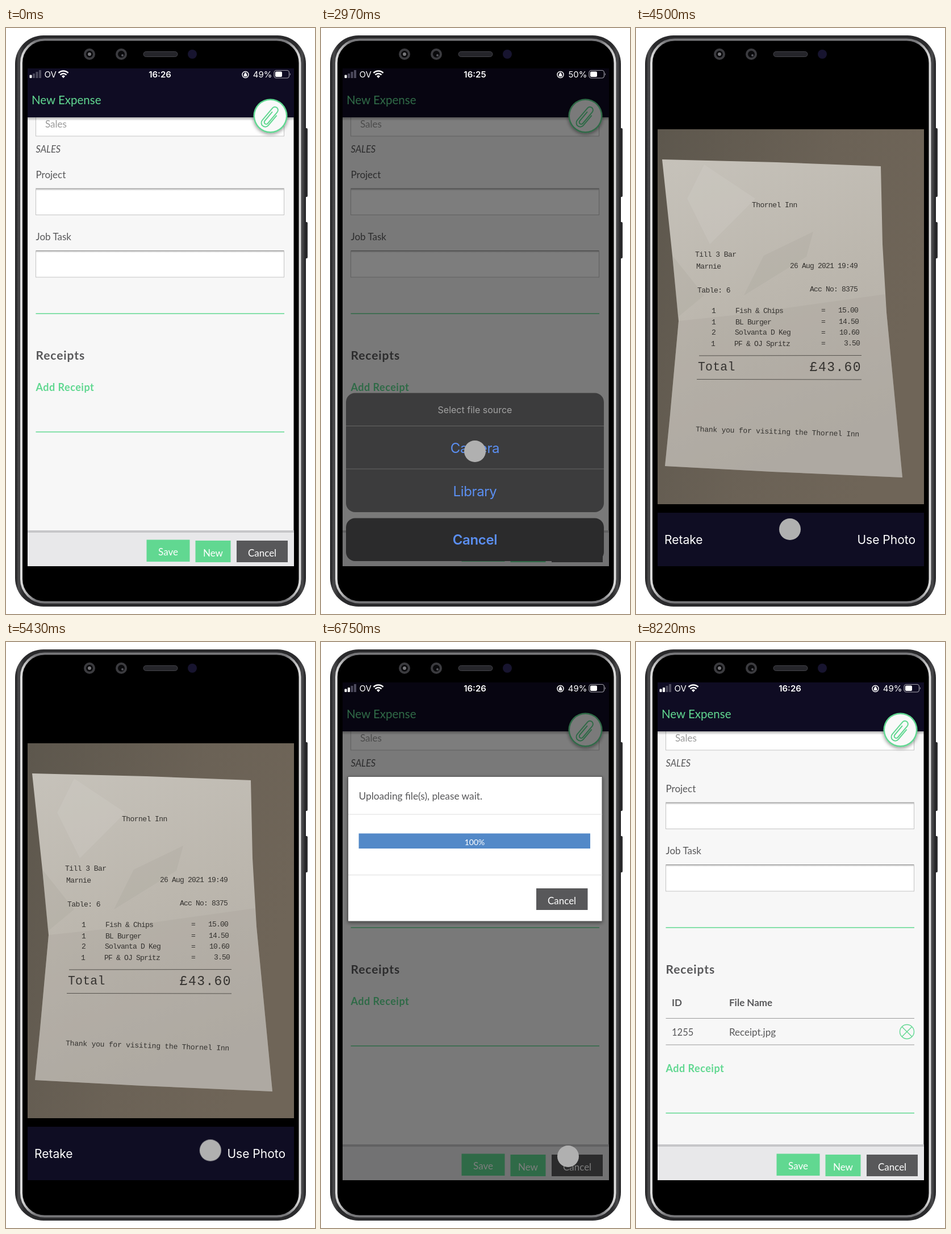
An HTML page that plays this animation: 544 px wide and 1030 px high, repeating every 9.48 s.

```html
<!DOCTYPE html>
<html lang="en">
<head>
<meta charset="utf-8">
<title>Adding a receipt</title>
<style>
html, body { margin: 0; width: 100%; height: 100%; overflow: hidden; background: #fff; }
svg { display: block; width: 100vw; height: 100vh; }
text { font: 17px Lato, "Open Sans", sans-serif; fill: #58585a; white-space: pre; }
.mid { text-anchor: middle; }
.end { text-anchor: end; }
.bold { font-weight: 700; }
.white { fill: #fff; }
.green { fill: #61d891; }
.rule { stroke: #61d891; stroke-width: 1.6; }
.grey { stroke: #999; stroke-width: 1.2; }
.thin { stroke: #ddd; }
.icon { fill: none; stroke: #61d891; stroke-width: 2; }
.field { fill: #fff; stroke: #c4c4c4; }
.ios text { font-family: Inter, Roboto, sans-serif; }
.status text { font-size: 15px; fill: #fff; }
.sheet text { font-size: 24px; letter-spacing: -.35px; fill: #5b8ff2; }
.bar text { font-size: 21px; fill: #fff; }
.paper text { font: 13px "Liberation Mono", "DejaVu Sans Mono", monospace; letter-spacing: -.55px; fill: #34322f; }
.paper .tight text { letter-spacing: -.8px; }
.paper .wide { font-size: 21.5px; letter-spacing: .2px; }
.paper .wide.end { font-size: 23px; letter-spacing: 1.4px; }

/* One shared 9480 ms clock; percentages are ms / 94.8 */
.a { animation: 9480ms step-end infinite; }
.sheet { animation-name: sheet; }
.before { animation-name: before; }
.camera { animation-name: camera; }
.live { animation-name: live; }
.review { animation-name: review; }
.upload { animation-name: upload; }
.busy { animation-name: busy; }
.done { animation-name: done; }
.list { animation-name: list; }
.push { animation-name: push; }
.signal { animation-name: signal; }
.dot { animation-name: dot-show, dot-move; }

@keyframes sheet { 0%, 31.962%, 100% { opacity: 0 } 16.1392% { opacity: 1 } }
@keyframes before { 0%, 31.962%, 100% { opacity: 1 } 16.1392% { opacity: 0 } }
@keyframes camera { 0%, 63.2911%, 100% { opacity: 0 } 31.962% { opacity: 1 } }
@keyframes live { 0%, 47.4683%, 100% { opacity: 0 } 31.962% { opacity: 1 } }
@keyframes review { 0%, 63.2911%, 100% { opacity: 0 } 47.4683% { opacity: 1 } }
@keyframes upload { 0%, 86.7088%, 100% { opacity: 0 } 63.2911% { opacity: 1 } }
@keyframes busy { 0%, 71.8354%, 100% { opacity: 0 } 63.2911% { opacity: 1 } }
@keyframes done { 0%, 86.7088%, 100% { opacity: 0 } 71.8354% { opacity: 1 } }
@keyframes list { 0% { opacity: 0 } 86.7088%, 100% { opacity: 1 } }
@keyframes push { 0% { transform: none } 86.7088%, 100% { transform: translateY(118px) } }
@keyframes signal { 0% { fill: #4c4a5c } 63.2911%, 100% { fill: #fff } }
@keyframes dot-show { 0%, 86.7088%, 100% { opacity: 0 } 9.1772% { opacity: 1 } }
@keyframes dot-move {
  0% { transform: translate(109px, 635px) }
  21.8354% { transform: translate(109px, 635px); animation-timing-function: steps(23, start) }
  29.1139% { transform: translate(271px, 744px) }
  38.6075% { transform: translate(271px, 744px); animation-timing-function: steps(20, start) }
  44.9367% { transform: translate(271px, 881px) }
  53.481% { transform: translate(271px, 881px); animation-timing-function: steps(24, start) }
  61.0759% { transform: translate(435px, 904px) }
  76.5822% { transform: translate(435px, 904px); animation-timing-function: steps(26, start) }
  84.8101%, 100% { transform: translate(426px, 467px) }
}
</style>
</head>
<body>
<svg viewBox="0 0 544 1030" xmlns="http://www.w3.org/2000/svg">
<defs>
  <linearGradient id="body">
    <stop offset="0" stop-color="#1d1d1f"/><stop offset=".012" stop-color="#4a4a4c"/>
    <stop offset=".03" stop-color="#2a2a2c"/><stop offset=".97" stop-color="#2a2a2c"/>
    <stop offset=".988" stop-color="#4a4a4c"/><stop offset="1" stop-color="#1d1d1f"/>
  </linearGradient>
  <linearGradient id="shine">
    <stop offset="0" stop-color="#dcdcdc"/><stop offset=".05" stop-color="#77777a"/>
    <stop offset=".95" stop-color="#77777a"/><stop offset="1" stop-color="#dcdcdc"/>
  </linearGradient>
  <linearGradient id="shade" x2="0" y2="1">
    <stop offset="0" stop-opacity=".3"/><stop offset="1" stop-opacity="0"/>
  </linearGradient>
  <linearGradient id="desk" x2="1" y2=".4">
    <stop offset="0" stop-color="#5d574d"/><stop offset=".6" stop-color="#6b6256"/><stop offset="1" stop-color="#6f6558"/>
  </linearGradient>
  <linearGradient id="sheet-tone" x2=".3" y2="1">
    <stop offset="0" stop-color="#c6c2ba"/><stop offset=".5" stop-color="#bcb7ae"/><stop offset="1" stop-color="#b1aca5"/>
  </linearGradient>
  <filter id="soft" x="-20%" y="-20%" width="140%" height="140%">
    <feDropShadow dx="0" dy="2" stdDeviation="3" flood-opacity=".45"/>
  </filter>
  <clipPath id="screen"><rect x="38" y="71" width="468.5" height="875"/></clipPath>
</defs>

<!-- Phone -->
<g>
  <rect x="523" y="176" width="8" height="121" rx="2" fill="#2c2c2e"/>
  <rect x="523" y="341" width="8" height="64" rx="2" fill="#2c2c2e"/>
  <rect x="16" y="13" width="512" height="1004" rx="50" fill="url(#body)"/>
  <rect x="27" y="20.5" width="490.500" height="989" rx="41" fill="#000" stroke="url(#shine)" stroke-width="4"/>
  <rect x="31" y="23.500" width="482.500" height="983" rx="38" fill="#000"/>
  <g stroke="#3b3b3f" stroke-width="4" fill="#09090b">
    <circle cx="147" cy="46" r="8"/><circle cx="203" cy="46" r="8"/>
  </g>
  <circle cx="147" cy="46" r="3" fill="#77777b"/>
  <circle cx="205" cy="48" r="2" fill="#55555b"/>
  <rect x="242" y="41.500" width="60" height="9" rx="4.500" fill="#25252a" stroke="#44444a"/>
  <circle cx="328" cy="46" r="8" fill="#17142f"/>
</g>

<g clip-path="url(#screen)">
  <!-- Expense form -->
  <rect x="38" y="71" width="469" height="875" fill="#f7f7f7"/>
  <rect class="field" x="52.5" y="140" width="437" height="50"/>
  <text x="69" y="174.500" style="fill:#999">Sales</text>
  <text x="52.500" y="219" style="font-size:16.500px;font-style:italic">SALES</text>
  <text x="52.500" y="264">Project</text>
  <rect class="field" x="52.5" y="282" width="437" height="46.500"/>
  <rect x="53" y="282" width="436" height="4" fill="url(#shade)"/>
  <text x="52.500" y="373">Job Task</text>
  <rect class="field" x="52.5" y="391.500" width="437" height="46.500"/>
  <rect x="53" y="391" width="436" height="4" fill="url(#shade)"/>
  <path class="rule" d="M52.5 502H490"/>
  <text class="bold" x="52.500" y="583" style="font-size:21px;letter-spacing:.9px">Receipts</text>
  <g class="a list">
    <text class="bold" x="63" y="640">ID</text>
    <text class="bold" x="164" y="640">File Name</text>
    <path class="grey" d="M52.5 661.500H490M52.5 708H490"/>
    <text x="63" y="692" style="font-size:16.500px">1255</text>
    <text x="164" y="692">Receipt.jpg</text>
    <path class="icon" style="stroke-width:1.4" d="M464.500 685a12.500 12.500 0 0 0 25 0a12.500 12.500 0 0 0 -25 0M468.200 676.200l17.600 17.600m0 -17.600l-17.600 17.600"/>
  </g>
  <g class="a push">
    <text class="bold green" x="52.500" y="638" style="font-size:18px;letter-spacing:.5px">Add Receipt</text>
    <path class="rule" d="M52.5 710H490"/>
  </g>
  <rect x="38" y="157" width="469" height="6" fill="url(#shade)"/>
  <rect x="38" y="71" width="469" height="86" fill="#0f0c23"/>
  <text class="green" x="45" y="134" style="font-size:20.500px">New Expense</text>
  <g filter="url(#soft)"><circle cx="465.500" cy="154.500" r="30" fill="#61d891"/></g>
  <circle cx="465.500" cy="154.500" r="27.500" fill="#f9f9f9"/>
  <path class="icon" transform="translate(465.500 156) rotate(40)" d="M-3 -9V12a3.500 3.500 0 0 0 7 0V-14a5.500 5.500 0 0 0 -11 0V14a7 7 0 0 0 14 0V-9"/>
  <rect x="38" y="884" width="469" height="62" fill="#e8e8ea"/>
  <rect x="38" y="883" width="469" height="4" fill="#c6c6c9"/>
  <rect class="green" x="247.500" y="899.500" width="76" height="38.500"/>
  <rect class="green" x="333.500" y="901" width="62" height="38"/>
  <rect x="406" y="901" width="90" height="38" fill="#58585a"/>
  <text class="mid white" x="285.500" y="927">Save</text>
  <text class="mid white" x="364.500" y="928.500">New</text>
  <text class="mid white" x="451" y="928.500">Cancel</text>

  <!-- File source sheet -->
  <g class="a sheet ios">
    <rect x="38" y="71" width="469" height="875" opacity=".51"/>
    <rect x="44" y="641.500" width="454" height="209.500" rx="16" fill="#3c3c3d"/>
    <path d="M44 699.500H498M44 775H498" stroke="#666"/>
    <rect x="44" y="861.500" width="454" height="75.500" rx="16" fill="#2b2b2c"/>
    <text class="mid" x="271" y="676.500" style="font-size:16px;letter-spacing:0;fill:#a2a2a2">Select file source</text>
    <text class="mid" x="271" y="746.500">Camera</text>
    <text class="mid" x="271" y="822.500">Library</text>
    <text class="mid" x="271" y="908" style="font-weight:600">Cancel</text>
  </g>

  <!-- Upload dialog -->
  <g class="a upload">
    <rect x="38" y="71" width="469" height="875" opacity=".51"/>
    <rect x="47.500" y="236.500" width="447.500" height="254.500" fill="#fff" stroke="#555" filter="url(#soft)"/>
    <path class="thin" d="M48 303H495M48 409.500H495"/>
    <rect x="66.500" y="336.500" width="407.500" height="26.500" fill="#5389c8"/>
    <text class="mid white" x="270.500" y="356.500" style="font-size:14px">100%</text>
    <rect x="379" y="433" width="90.500" height="38" fill="#58585a"/>
    <g class="a busy">
      <text x="66.500" y="277" style="font-size:17.300px">Uploading file(s), please wait.</text>
      <text class="mid white" x="424" y="460.500">Cancel</text>
    </g>
    <g class="a done">
      <text x="66.500" y="277" style="font-size:17.300px">Upload complete.</text>
      <text class="mid white" x="424" y="460.500">Close</text>
    </g>
  </g>

  <!-- Status bar -->
  <g class="status ios" fill="#fff">
    <rect x="41.500" y="82.500" width="4" height="5.500" rx="1"/>
    <rect class="a signal" x="47" y="80" width="4" height="8" rx="1"/>
    <path d="M52.500 77h4v11h-4zM58 74h4v14h-4z" fill="#4c4a5c"/>
    <text x="67.500" y="87">OV</text>
    <path d="M101 88l-3 -3.200a4.300 4.300 0 0 1 6 0z"/>
    <path d="M95.500 82.300a7.800 7.800 0 0 1 11 0M92.500 79a12 12 0 0 1 17 0" fill="none" stroke="#fff" stroke-width="2.600"/>
    <circle cx="421.500" cy="82" r="5.500" fill="none" stroke="#fff" stroke-width="1.400"/>
    <path d="M419 81.500h5v3.500h-5zM420 81.500v-1.500a1.500 1.500 0 0 1 3 0v1.500" stroke="#fff" stroke-width=".6"/>
    <rect x="472" y="74.500" width="26.500" height="13.500" rx="4" fill="none" stroke="#a3a2ab" stroke-width="1.200"/>
    <rect x="474" y="76.500" width="12" height="9.500" rx="2"/>
    <path d="M500 79v4.500q2 -2.250 0 -4.500" fill="#a3a2ab"/>
    <g class="a before">
      <text class="mid" x="271" y="87" style="font-weight:600">16:26</text>
      <text class="end" x="468.500" y="87">49%</text>
    </g>
    <g class="a sheet-time sheet">
      <text class="mid" x="271" y="87" style="font:600 15px Inter,sans-serif;letter-spacing:0;fill:#fff">16:25</text>
      <text class="end" x="468.500" y="87" style="font-size:15px;letter-spacing:0;fill:#fff">50%</text>
    </g>
  </g>

  <!-- Camera and photo review -->
  <g class="a camera">
    <rect x="38" y="71" width="469" height="875"/>
    <rect x="38" y="178" width="469" height="659" fill="url(#desk)"/>
    <path d="M46 231L247 236 431 243 434 380 441 500 469 790 240 780 51 770 60 680 75 515 64 400Z" fill="url(#sheet-tone)"/>
    <path d="M75 515L180 504 438 468 441 500 469 790 240 780 51 770 60 680Z" fill="#a8a39b" opacity=".35"/>
    <path d="M225 400L312 358 300 402 190 470ZM64 400L120 470 74 508Z" fill="#aaa59c" opacity=".3"/>
    <path d="M120 240L210 300 130 380 90 300Z" fill="#d2cec7" opacity=".3"/>
    <g class="paper">
      <text x="204" y="314.500">Thornel Inn</text>
      <text x="104" y="401.500">Till 3 Bar</text>
      <text x="106" y="423">Marnie</text>
      <text x="108" y="465">Table: 6</text>
      <g class="tight">
        <text x="271" y="422">26 Aug 2021 19:49</text>
        <text x="306" y="463">Acc No: 8375</text>
        <text x="133" y="501">1</text><text x="175" y="501">Fish &amp; Chips</text><text x="326" y="500">=</text><text class="end" x="391" y="500">15.00</text>
        <text x="133" y="521">1</text><text x="175" y="521">BL Burger</text><text x="326" y="520">=</text><text class="end" x="392" y="520">14.50</text>
        <text x="133" y="539">2</text><text x="174" y="539">Solvanta D Keg</text><text x="326" y="539">=</text><text class="end" x="393" y="539">10.60</text>
        <text x="132" y="559">1</text><text x="173" y="559">PF &amp; OJ Spritz</text><text x="326" y="558">=</text><text class="end" x="394" y="558">3.50</text>
      </g>
      <path d="M111 576L397 575.500M107 617.500L397 618" stroke="#55524d"/>
      <text class="wide" x="109" y="602">Total</text>
      <text class="wide end" x="397" y="602.500">£43.60</text>
      <text transform="translate(105 709) rotate(1.800)" style="letter-spacing:-.22px">Thank you for visiting the Thornel Inn</text>
    </g>
    <g class="a live bar ios">
      <circle cx="272.500" cy="886" r="38" fill="none" stroke="#fff" stroke-width="5"/>
      <circle cx="272.500" cy="886" r="33" fill="#fff"/>
      <text x="50.500" y="907">Cancel</text>
    </g>
    <g class="a review bar ios">
      <rect x="38" y="852" width="469" height="94" fill="#0f0d23"/>
      <text x="50" y="907">Retake</text>
      <text class="end" x="492" y="907">Use Photo</text>
    </g>
  </g>
</g>

<circle class="a dot" r="19" fill="#b0b0b0"/>
</svg>
</body>
</html>
```
